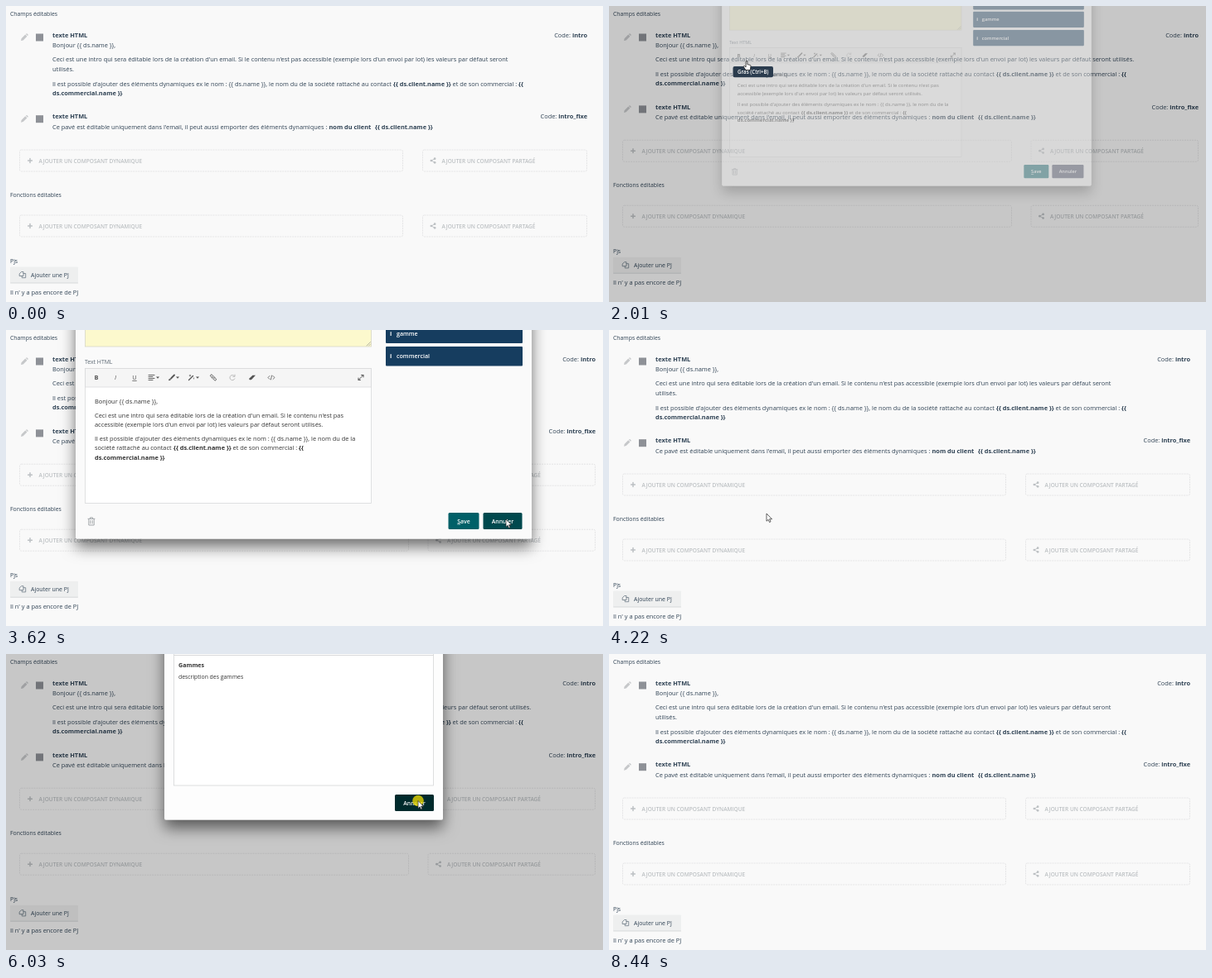
These frames come from a looping animation (720 px wide and 358 px high, 9.24 s). An HTML page:

```html
<!DOCTYPE html>
<html lang="fr">
<head>
<meta charset="utf-8">
<title>Champs éditables</title>
<style>
  html, body { margin: 0; width: 100%; height: 100%; overflow: hidden; background: #f9f9f9; }
  svg { display: block; }
  text { font-family: "Open Sans", "Noto Sans", sans-serif; font-size: 7.4px; white-space: pre; }
  .label { font-size: 6.87px; }
  .b { font-weight: 700; }
  .caps { font-size: 6.55px; font-weight: 600; }
  .btn { font-size: 6.9px; font-weight: 600; fill: #fff; }
  .tip { font-size: 6.2px; font-weight: 600; fill: #fff; }
  .line { fill: none; stroke-linecap: round; stroke-linejoin: round; }
</style>
</head>
<body>
<svg width="720" height="358" viewBox="0 0 720 358">
  <defs>
    <filter id="shadow" filterUnits="userSpaceOnUse" x="0" y="-260" width="720" height="620">
      <feDropShadow dx="0" dy="10" stdDeviation="9" flood-color="#000" flood-opacity=".55"/>
    </filter>
  </defs>
  <rect width="720" height="358" fill="#f9f9f9"/>
  <g id="page"></g>
  <rect id="dim" width="720" height="358" opacity=".2"/>
  <g id="modal"></g>
  <g id="front"></g>
</svg>
<script>
(() => {
const LOOP = 9240;
const INK = '#2f4254', YELLOW = '#f7c44c', BLUE = '#2780b9', NAVY = '#163d5f';
const $ = id => document.getElementById(id);

const say = (x, y, s, cls = '', more = '') =>
  `<text x="${x}" y="${y + 2.6}" class="${cls}" ${more}>${s}</text>`;
const box = (x, y, w, h, fill, more = '') =>
  `<rect x="${x}" y="${y}" width="${w}" height="${h}" fill="${fill}" ${more}/>`;
const line = (d, color, w = 1) =>
  `<path class="line" d="${d}" stroke="${color}" stroke-width="${w}"/>`;
const group = (x, y, inner) => `<g transform="translate(${x} ${y})">${inner}</g>`;

// Icons, centred on their own origin
const caret = c => `<path d="M4-1H8L6 1.2z" fill="${c}"/>`;
const icon = {
  pencil: c => `<path d="M-4 4l.6-2.7L1.3-3.4 3.4-1.3-1.3 3.4zM1.9-4l.6-.5q.5-.3 1 .1l1 1q.4.5.1 1L4-1.9z" fill="${c}"/>`,
  plus: c => line('M-2.4 0H2.4M0-2.4V2.4', c, 1.5),
  share: c => line('M2-2.2L-2 0L2 2.2', c, .9) +
    [[-2.1, 0], [2.1, -2.3], [2.1, 2.3]].map(p => `<circle cx="${p[0]}" cy="${p[1]}" r="1.35" fill="${c}"/>`).join(''),
  copy: c => line('M-3.5-1.5L-1.5-3.5H1V1.5H-3.5zM1-1.5H3.7V3.7H-.8V1.5', c, .8),
  trash: c => line('M-4-3.2H4M-1.5-3.2V-4.6H1.5V-3.2M-3.2-3V4.5H3.2V-3M-1.2-1V2.5M1.2-1V2.5', c, 1),
  up: c => line('M-4.5 2.5L0-2L4.5 2.5', c, 2.4),
  down: c => line('M-4.5-2.5L0 2L4.5-2.5', c, 2.4),
  align: c => line('M-5-3H2M-5-1H0M-5 1H2M-5 3H0', c, .9) + caret(c),
  brush: c => line('M2-3L-1.5 .5', c, 1.8) + line('M-2.2 1Q-4 1-4.6 3.2-2.4 3.5-1.7 1.6', c, 1) + caret(c),
  wand: c => line('M-4.5 3L.5-2', c, 1.3) + line('M-3-3.2v1.6M-3.8-2.4h1.6M1.5 .5v1', c, .7) + caret(c),
  link: c => `<g transform="rotate(45)">${line('M-.5-1.3H-3.2Q-4.4-1.3-4.4 0T-3.2 1.3H-.5M.5-1.3H3.2Q4.4-1.3 4.4 0T3.2 1.3H.5M-1.6 0H1.6', c, .9)}</g>`,
  redo: c => line('M2.5-1.8A3.1 3.1 0 1 0 2.9 1.4M3-3.4V-1.2H.8', c, 1),
  eraser: c => `<path d="M-4 1.6L.4-2.8H4L-.4 1.9-1.4 2.8H-3.2z" fill="${c}"/>`,
  code: c => line('M-2-2L-4 0L-2 2M2-2L4 0L2 2M.6-2.5L-.6 2.5', c, .8),
  expand: c => line('M-3 3L3-3M.6-3H3V-.6M-3 .6V3H-.6', c, 1),
};
const put = (name, x, y, c) => group(x, y, icon[name](c));

function row(y, h, hot, right, name, body) {
  const c = hot ? '#fff' : INK;
  let s = hot ? box(5, y - 11.5, 707, h, YELLOW) : '';
  s += put('pencil', 22, y + 3, hot ? '#fff' : '#c6c8ca') +
    box(36, y - 1.5, 9, 9, hot ? '#fff' : '#8e9197');
  s += `<g fill="${c}">${say(56, y, 'texte HTML', 'b')}${body}</g>`;
  if (!hot) return s + say(right, y, `Code: <tspan class="b">${name}</tspan>`, '', `text-anchor="end" fill="${INK}"`);
  s += box(609, y - 11.5, 103, h, BLUE) +
    line(`M642.5 ${y - 11}v${h - 1}M676.5 ${y - 11}v${h - 1}`, '#3a8cc2', .8);
  const mid = y - 11.5 + h / 2;
  return s + put('trash', 625, mid, '#fff') + put('up', 659, mid, '#fff') + put('down', 694, mid, '#fff');
}

function adder(x, x2, y, mark, label, hot) {
  const c = hot ? '#fff' : '#bcc0c3';
  return box(x + .5, y - 13, x2 - x - 1, 26, hot ? YELLOW : 'none',
      `rx="2" stroke="${hot ? YELLOW : '#e2e3e4'}" stroke-width=".9"` + (hot ? '' : ' stroke-dasharray="2 1"')) +
    put(mark, x + 13, y, c) + say(x + 23.5, y, label, 'caps', `fill="${c}"`);
}

function page({ wide, hover }) {
  const up = wide ? -11.8 : 0, right = wide ? 711 : 701;
  const intro = "Ceci est une intro qui sera éditable lors de la création d'un email. Si le contenu n'est pas accessible (exemple lors d'un envoi par lot) les valeurs par défaut seront";
  const first = say(56, 47, 'Bonjour {{ ds.name }},') +
    say(56, 64.5, intro + (wide ? ' utilisés.' : '')) +
    (wide ? '' : say(56, 76, 'utilisés.')) +
    say(56, 94 + up, "Il est possible d'ajouter des éléments dynamiques ex le nom : {{ ds.name }}, le nom du de la société rattaché au contact") +
    say(467, 94 + up, '{{ ds.client.name }}', 'b') +
    say(538.5, 94 + up, 'et de son commercial :') + say(618, 94 + up, '{{', 'b') +
    say(56, 105.5 + up, 'ds.commercial.name }}', 'b');
  const second = say(56, 146 + up, "Ce pavé est éditable uniquement dans l'email, il peut aussi emporter des éléments dynamiques :") +
    say(389.5, 146 + up, 'nom du client', 'b') + say(445, 146 + up, '{{ ds.client.name }}', 'b');
  const adders = (y, key) =>
    adder(16, wide ? 486 : 479, y + up, 'plus', 'AJOUTER UN COMPOSANT DYNAMIQUE', hover === key) +
    adder(wide ? 508.5 : 502, right, y + up, 'share', 'AJOUTER UN COMPOSANT PARTAGÉ');
  const ink = `fill="${INK}"`;
  return say(5, 9.5, 'Champs éditables', 'label', ink) +
    row(35, 98.5, hover === 'row1', right, 'intro', first) +
    row(133.7 + up, 39, hover === 'row2', right, 'intro_fixe', second) +
    adders(187, 'add1') + say(5, 228 + up, 'Fonctions éditables', 'label', ink) + adders(266, 'add2') +
    say(5, 308 + up, 'Pjs', 'label', ink) +
    box(5, 315.5 + up, 82, 19.5, '#eeefef', 'rx="1"') + line(`M5.5 ${335 + up}H86.5`, '#d0d2d4', .8) +
    put('copy', 20, 325 + up, '#6d7a86') + say(30, 325.3 + up, 'Ajouter une PJ', '', `${ink} style="font-size:6.95px"`) +
    say(5, 346 + up, "Il n' y a pas encore de PJ", '', ink);
}

const button = (x, y, w, fill, label) =>
  box(x, y, w, 20, fill, 'rx="1.5"') + say(x + w / 2, y + 10, label, 'btn', 'text-anchor="middle"');

function editor(cancel) {
  const tools = [['align', 177], ['brush', 201], ['wand', 225], ['link', 250], ['redo', 273], ['eraser', 297], ['code', 320], ['expand', 428]];
  const tag = (y, s) => box(458, y, 165, 23.5, NAVY, 'rx="1"') +
    say(463, y + 11.5, 'i', 'b', 'fill="#fff"') + say(471, y + 11.5, s, 'btn', 'style="font-size:7.1px"');
  return box(84, -116, 550, 368.5, '#fafafa', 'rx="2" filter="url(#shadow)"') +
    box(95.5, -60, 345, 80, '#fcf9cd', 'stroke="#d6d6c8" stroke-width=".8"') +
    line('M435 19L439.5 14.5M437.5 19L439.5 17', '#888', .6) +
    tag(-34, 'client') + tag(-7.5, 'gamme') + tag(20, 'commercial') +
    say(95, 38, 'Text HTML', 'label', 'fill="#5d6974"') +
    box(95.5, 46.5, 345, 163, '#fff', 'stroke="#d9dadb" stroke-width=".8"') +
    box(95.5, 46.5, 345, 22.5, '#f5f5f5', 'stroke="#d9dadb" stroke-width=".8"') +
    `<g fill="#555" text-anchor="middle">${say(109, 57.5, 'B', 'b')}${say(132, 57.5, 'I', '', 'font-style="italic"')}${say(155, 57.5, 'U', '', 'text-decoration="underline"')}</g>` +
    tools.map(([n, x]) => put(n, x, 57.5, n === 'redo' ? '#bbb' : '#555')).join('') +
    `<g fill="#333">` +
    say(107, 86.5, 'Bonjour {{ ds.name }},') +
    say(107, 103, "Ceci est une intro qui sera éditable lors de la création d'un email. Si le contenu n'est pas") +
    say(107, 114.3, "accessible (exemple lors d'un envoi par lot) les valeurs par défaut seront utilisés.") +
    say(107, 131.3, "Il est possible d'ajouter des éléments dynamiques ex le nom : {{ ds.name }}, le nom du de la") +
    say(107, 142.6, 'société rattaché au contact') + say(202, 142.6, '{{ ds.client.name }}', 'b') +
    say(273.5, 142.6, 'et de son commercial :') + say(353, 142.6, '{{', 'b') +
    say(107, 154, 'ds.commercial.name }}', 'b') + '</g>' +
    put('trash', 103, 231.5, '#a4a8ac') +
    button(533.5, 221, 37, '#006068', '<tspan text-decoration="underline">S</tspan>ave') +
    button(575.5, 221, 47, cancel, 'Annuler');
}

function picker(cancel) {
  return box(191, -240, 336, 440.5, '#fdfdfd', 'rx="2" filter="url(#shadow)"') +
    box(202.5, -150, 313, 309, '#fff', 'stroke="#d5d6d7" stroke-width=".8"') +
    line('M203 1.5H515', '#cfd0d1', .8) +
    `<g fill="#333">${say(208, 13, 'Gammes', 'b', 'style="font-size:7.1px"')}${say(208, 27, 'description des gammes', 'label')}</g>` +
    button(469, 170, 47, cancel, 'Annuler');
}

const dialogs = { editor: { draw: editor, cy: 68 }, picker: { draw: picker, cy: -20 } };

const pointers = {
  arrow: '<path d="M0 0V9.2L2.1 7.3 3.5 10.5 5 9.8 3.6 6.7H6.5z" fill="#fff" stroke="#222" stroke-width=".7"/>',
  hand: '<path d="M-.9 .9Q0-.4 .9 .9V4.6L4 5.3Q5 5.6 5 6.8L4.2 11.5H-1L-3.6 7.6Q-3.8 6.3-2.4 6.6L-.9 7.8z" fill="#fff" stroke="#222" stroke-width=".8"/>',
};

function front({ at, hand, click, tip }) {
  let s = tip ? box(149.5, 73, 48.5, 13.2, '#2b3c4e', 'rx="2"') + say(173.8, 79.6, 'Gras (Ctrl+B)', 'tip', 'text-anchor="middle"') : '';
  if (click) s += `<circle cx="${at[0]}" cy="${at[1]}" r="6.8" fill="#f4e000" opacity=".75"/>`;
  return at ? s + group(at[0], at[1], pointers[hand ? 'hand' : 'arrow']) : s;
}

const PLAIN = '#3f4560', HOT = '#00494e', PRESSED = '#002a2c';
const onRow = { at: [166, 66], hand: 1 }, onAdd = { at: [108, 266], hover: 'add2' };
const onCancel1 = { at: [603, 229], cancel: HOT }, onCancel2 = { at: [497, 177.5], cancel: PRESSED };
const edit = { wide: 1, modal: 'editor', size: 1, alpha: 1 };
const pick = { ...edit, modal: 'picker' };
const steps = [
  [0, {}],
  [400, { ...onRow, hover: 'row1' }],
  [1400, { ...onRow, hover: 'row1', click: 1 }],
  [1600, { ...edit, ...onRow, wide: 0, hover: 'row1', dim: 1, size: .15, alpha: .06 }],
  [2010, { ...edit, ...onRow, dim: 1, size: .81, alpha: .35, tip: 1 }],
  [2210, { ...edit, at: [360, 140], dim: 1, size: .95, alpha: .8 }],
  [2410, { ...edit, ...onCancel1, dim: 1 }],
  [3620, { ...edit, ...onCancel1 }],
  [3820, { ...edit, at: [560, 210], size: .75, alpha: .35 }],
  [4020, { at: [360, 146], hover: 'row2' }],
  [4220, { at: [190, 222] }],
  [4420, onAdd],
  [4820, { ...pick, ...onAdd, wide: 0, dim: 1, size: .15, alpha: .06 }],
  [5220, { ...pick, at: [108, 266], dim: 1, size: .81, alpha: .35 }],
  [5420, { ...pick, at: [180, 250], dim: 1, size: .95, alpha: .8 }],
  [5620, { ...pick, at: [340, 214], dim: 1 }],
  [5830, { ...pick, ...onCancel2, cancel: HOT, dim: 1 }],
  [6030, { ...pick, ...onCancel2, click: 1, dim: 1 }],
  [7830, { ...pick, ...onCancel2 }],
  [8030, { at: [490, 168] }],
  [8230, { at: [480, 142], hover: 'row2' }],
  [8440, {}],
];

function show(s) {
  $('page').innerHTML = page(s);
  $('dim').style.display = s.dim ? '' : 'none';
  const m = $('modal'), d = dialogs[s.modal];
  m.innerHTML = d ? d.draw(s.cancel || PLAIN) : '';
  if (d) {
    m.setAttribute('transform', `translate(359 ${d.cy}) scale(${s.size}) translate(-359 ${-d.cy})`);
    m.setAttribute('opacity', s.alpha);
  }
  $('front').innerHTML = front(s);
}

const start = performance.now();
let shown;
function tick() {
  const t = (performance.now() - start) % LOOP;
  const [, state] = steps.findLast(([at]) => at <= t);
  if (state !== shown) show(shown = state);
  requestAnimationFrame(tick);
}
tick();
})();
</script>
</body>
</html>
```
